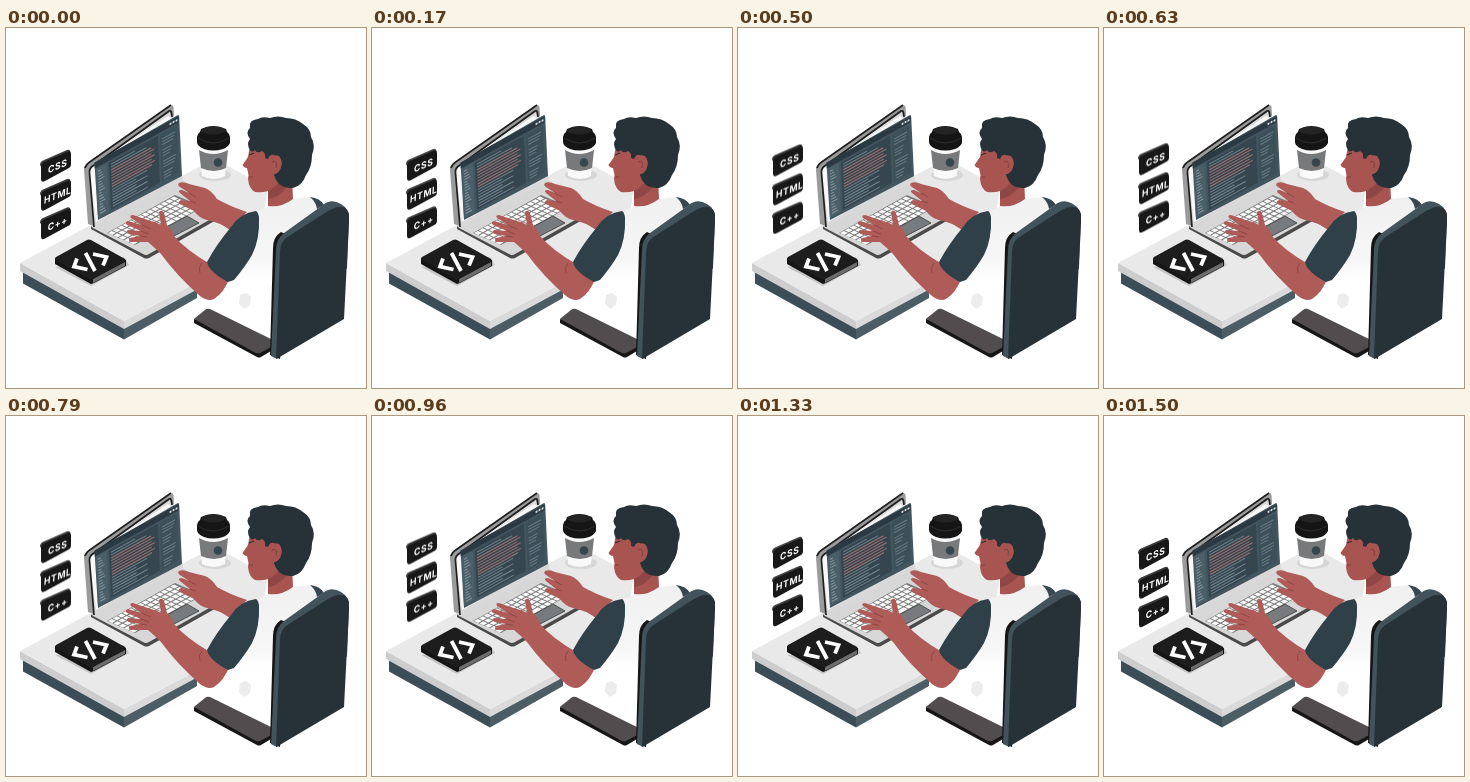
Animation of 360 by 360 pixels, one loop 1540 ms. Source, as an HTML page:

```html
<!DOCTYPE html>
<html lang="en">
<head>
<meta charset="utf-8">
<title>Coder at a desk</title>
<style>
  html, body { margin: 0; width: 100%; height: 100%; overflow: hidden; background: #fff; }
  svg { display: block; width: 100vw; height: 100vh; }
  .tag text { font: bold 9.7px Inter, "Liberation Sans", sans-serif; letter-spacing: .6px; fill: #fff; text-anchor: middle; }
</style>
</head>
<body>
<svg viewBox="0 0 360 360">
  <defs>
    <linearGradient id="shirt" x1="0" y1="0" x2="0" y2="1">
      <stop offset="0" stop-color="#f0f0f0"/>
      <stop offset=".4" stop-color="#f6f6f6"/>
      <stop offset=".55" stop-color="#fff"/>
    </linearGradient>
  </defs>

  <g id="desk">
    <path fill="#3b4d57" d="M17 243L118 299V311.500L17 255.500Z"/>
    <path fill="#4c5d66" d="M118 299L191 260V270L118 311.500Z"/>
    <path fill="#cdcdcd" d="M14 235L118 293V301L14 243Z"/>
    <path fill="#dadada" d="M118 293L192 254V261L118 301Z"/>
    <path fill="#e9e9e9" d="M14 235L178 147Q204 131 222 138L262 160L252 222L118 293Z"/>
  </g>

  <g id="book">
    <path fill="#c4c4c4" d="M49 239L85 258L123 237L118 229Z"/>
    <path fill="#151515" d="M49 230V236L85 256L88 255L120 238V232Z"/>
    <path fill="#6c6c6c" d="M87 251L119 234V238L87 255Z"/>
    <path fill="#1d1d1d" d="M50 229L81 212Q83 211 85 212L119 231Q120 232 119 233L87 251Q85 252 83 251L50 232Q48 231 50 229Z"/>
    <path fill="none" stroke="#fff" stroke-width="3.800" d="M71 230.500L68 238.500L81.500 241.500M87 226L100.500 229L97 237.500M79.500 225L89 243"/>
  </g>

  <g id="cup">
    <ellipse cx="209" cy="147" rx="16" ry="6" fill="#d6d6d6"/>
    <path fill="#f9f9f9" d="M193 112H222L219 148Q208 154 196 148Z"/>
    <path fill="#77797a" d="M193 122Q207 130 222 122L220 140Q208 146 195 140Z"/>
    <circle cx="212" cy="134.500" r="4.300" fill="#35464e"/>
    <path fill="#151515" d="M191 109Q191 106 194 104L195 101Q207 95 220 101L221 104Q224 106 224 109V115Q222 119 217 121Q207 124 198 121Q191 118 191 114Z"/>
    <ellipse cx="207.500" cy="102.500" rx="12" ry="4" fill="#242424"/>
    <path fill="none" stroke="#303030" d="M192 110Q207 120 223 110"/>
  </g>

  <g id="laptop">
    <path fill="#4a4a4a" d="M85 198V201L138 230Q140 231 143 230L221 186V181L140 226Z"/>
    <path fill="#d7d7d7" d="M85 198L176 152L222 178Q224 180 221 182L143 226Q140 228 137 226L87 200Z"/>
    <path fill="#7a7a7a" d="M101 205L169 167L197 179L129 217Z"/>
    <g id="keys" fill="#fafafa"></g>
    <path fill="#777b7e" stroke="#3a3a3a" stroke-width=".8" d="M157 201L181 188L193 195L168 208Z"/>
    <path fill="#d9d9d9" d="M83 143L164 84L167 82L177 152L87 199Z"/>
    <path fill="#f8f8f8" d="M84 145Q84 141 87 139L160 89Q164 87 165 91L172 148L90 194Z"/>
    <path fill="#9b9b9b" d="M82 196L78 142Q77.500 138 81 135.500L163 78.500Q167 76 167.500 79L168 88L165 88L164 84L87 138Q83 141 83.500 145L88 198Z"/>
    <path fill="none" stroke="#1f1f1f" stroke-width="1.700" d="M88 199L83.500 145Q83 141 86 138.500L163 83Q165 82 165.500 85L166 89M79 140Q80 136.500 83 134.500L165 77"/>
    <path fill="#43565f" d="M88.500 135L171 87.500Q173 86 173.200 89L176 148L92 192Z"/>
    <g id="code" transform="matrix(1 -.55 .045 1 88.500 134.500)">
      <path fill="#2b3a42" d="M0 0H84V6H0Z"/>
      <path fill="#4b5f69" d="M1 7H12V56H1Z"/>
      <path fill="#35464f" d="M14 8H63V55H14Z"/>
      <path fill="#3c505a" d="M65 8H82V55H65Z"/>
      <path fill="#dfe4e6" d="M75 2h1.800v2H75zM78 2h1.800v2H78zM81 2h1.800v2H81z"/>
    </g>
  </g>

  <g id="person">
    <path fill="url(#shirt)" d="M247 186Q260 178 284 171L306 169Q315 174 318 182L270 220L265 322L242 306L224 262Z"/>
    <path fill="#37474f" d="M304 169Q314 170 318 177L311 181Q310 174 304 169Z"/>
    <path fill="#ececec" d="M234 267L240 265L245 269L244 277L238 281L233 276Z"/>
    <g fill="#af5c59">
      <path d="M173 155Q177 153 183 156L199 160Q206 163 211 171Q223 178 241 184L224 202Q213 194 201 192Q193 190 188 183L174 176Q171 174 175 172L184 173L174 165Q171 162 176 162L183 165L174 159Q171 157 173 155Z"/>
      <path d="M153 184Q156 181 158 185L161 197Q166 201 168 208Q180 222 204 236L224 249Q218 265 208 271Q202 274 194 268Q171 248 155 226Q148 219 142 214L126 214Q121 213 124 210L134 208L123 206Q119 204 122 202L135 203L121 197Q118 194 122 193L136 197L125 190Q123 187 127 187L145 193Q151 194 155 197Z"/>
    </g>
    <path fill="none" stroke="#85403f" stroke-width=".8" d="M136 197L145 201M135 203L143 206M134 208L141 209M183 165L190 169M184 173L190 175M194 245Q192 239 196 235"/>
    <path fill="#2f4048" d="M250 183Q234 185 225 199Q210 217 201 234Q203 244 222 254L228 252Q239 239 246 227Q254 211 253 189Q252 184 250 183Z"/>

    <path fill="#a85552" d="M245 110Q243 124 242 129L236.500 137Q238 140 241 140L242.500 147L242 151Q243 161 249 164Q256 165 262 163L262 178Q275 180 287 171L285 128L268 106Z"/>
    <path fill="#8f4644" d="M262 163Q270 159 275 152L280 160Q272 170 262 171Z"/>
    <path fill="#263238" d="M244 122Q240 116 244 111Q239 104 244 100Q242 92 252 91Q256 88 264 90Q272 87 280 90Q290 90 297 96Q305 101 305 109Q310 117 306 127Q306 139 300 147Q296 158 287 160Q275 161 270 152L268 147L268 127Q264 126 262 131L259 130Q260 125 256 123Q251 126 249 122Q246 125 244 122Z"/>
    <path fill="#a85552" d="M262 133Q266 125 273 128Q278 134 274 142Q270 148 263 146Z"/>
    <path fill="none" stroke="#7f3c3b" stroke-width=".9" d="M266 134Q272 131 270 140M243 149L247 149"/>
    <path fill="none" stroke="#263238" stroke-width="1.300" d="M243 127L248 125"/>
  </g>

  <g id="chair">
    <path fill="#161616" d="M188 291V295L251 329Q253 330 255 329L270 320V314Z"/>
    <path fill="#514d4f" d="M189 290L199 282Q201 280 204 281L267 312L269 317L254 325Q251 326 248 324L190 292Q187 291 189 290Z"/>
    <path fill="#161616" d="M264 327L267 220Q267 209 275 204L284 208L274 331Z"/>
    <path fill="#43535b" d="M265 328L270 222Q270 211 278 205L317 177Q325 170 335 176Q344 181 343 192L341 240L271 331Z"/>
    <path fill="#263238" d="M270 331L274 224Q274 213 283 208L322 183Q339 173 343 186V193L338 291L272 330Z"/>
  </g>

  <g id="tags"></g>
</svg>
<script>
  const byId = id => document.getElementById(id);

  // Keyboard laid out on the deck's two slanted axes.
  const cols = 14, rows = 5;
  const deck = (u, v) =>
    `${(102 + 67 * u / cols + 27 * v / rows).toFixed(1)} ${(205 - 37 * u / cols + 12 * v / rows).toFixed(1)}`;
  const key = (c, r, w) =>
    `M${deck(c, r)}L${deck(c + w, r)}L${deck(c + w, r + .78)}L${deck(c, r + .78)}Z`;
  let keys = key(5, 4, 3.8);
  for (let r = 0; r < rows; r++) {
    for (let c = 0; c < cols; c++) {
      if (r < 4 || c < 5 || c > 8) keys += key(c, r, .8);
    }
  }
  byId('keys').innerHTML = `<path d="${keys}"/>`;

  // Lines of code, with a highlighted block in the middle.
  const bar = (x, y, w, fill) => `<rect x="${x}" y="${y}" width="${w}" height="1.1" fill="${fill}"/>`;
  let lines = '';
  for (let i = 0; i < 16; i++) {
    const y = 10 + i * 2.8;
    const hot = i > 1 && i < 9;
    lines += bar(3, y, 3 + i * 5 % 4, '#82939b');
    lines += bar(16, y, hot ? 40 + i * 3 % 6 : 24 + i * 11 % 22, hot ? '#9d706e' : '#72848d');
    if (i % 4) lines += bar(67, y, 6 + i * 7 % 8, '#687a84');
  }
  byId('code').insertAdjacentHTML('beforeend', lines);

  const tag = (label, y) => `
    <g class="tag" transform="translate(34 ${y})">
      <path fill="#3c3c3c" d="M0 15Q0 12 3 10.500L27 0Q30 -1 30.500 2L28 8L3 20Z"/>
      <path fill="#181818" d="M1 17Q1 13.500 4 12L28 1.500Q31 .5 31 4V14Q31 17 28 18.500L5 31Q1 33 1 29Z"/>
      <text transform="matrix(.9 -.36 -.06 1 17.500 19.500)">${label}</text>
    </g>`;
  const tags = byId('tags');
  tags.innerHTML = tag('CSS', 122) + tag('HTML', 151) + tag('C++', 179.5);

  const easing = 'cubic-bezier(.37, 0, .63, 1)';
  tags.animate([
    { transform: 'translateY(0)', easing },
    { transform: 'translateY(-6.8px)', offset: .46, easing },
    { transform: 'translateY(0)' }
  ], { duration: 1540, iterations: Infinity });
</script>
</body>
</html>
```
